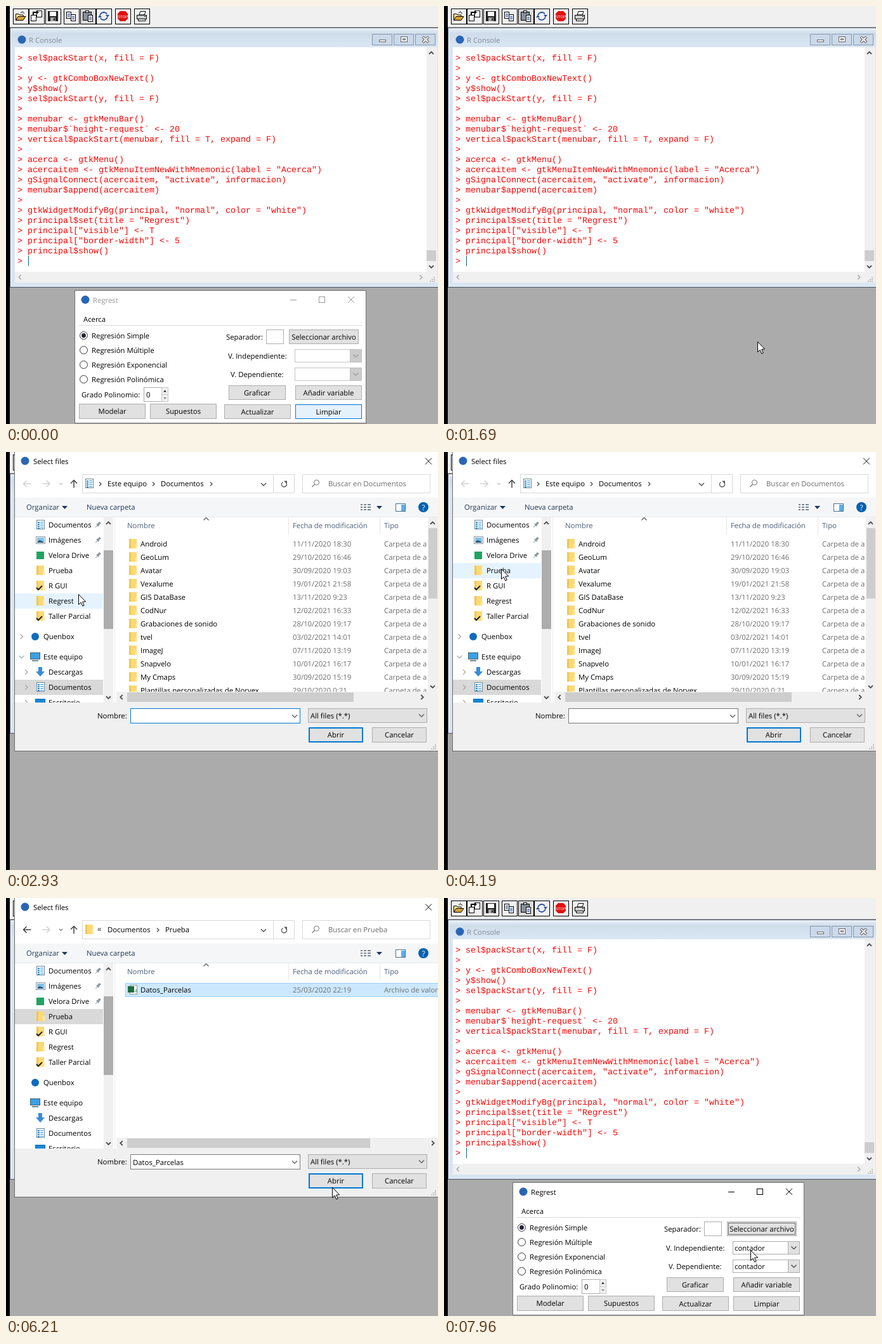
Write an HTML page with a canvas that moves like this. It is 681 px wide and 659 px high and loops after 8 s.

```html
<!DOCTYPE html>
<html lang="es">
<head>
<meta charset="utf-8">
<title>Regrest</title>
<style>
html, body { margin: 0; width: 100%; height: 100%; overflow: hidden; background: #ababab; }
canvas { display: block; }
</style>
</head>
<body>
<canvas id="stage" width="681" height="659"></canvas>
<script>
const c = document.getElementById('stage').getContext('2d');
const LOOP = 8000, BLUE = '#0078d7', GREY = '#adadad', FACE = '#e1e1e1';

// ---- drawing helpers ----
function box(x, y, w, h, fill, edge, lw = 1) {
  if (edge) { c.fillStyle = edge; c.fillRect(x, y, w, h); x += lw; y += lw; w -= 2 * lw; h -= 2 * lw; }
  c.fillStyle = fill;
  c.fillRect(x, y, w, h);
}
function poly(pts, stroke, fill, lw = 1) {
  c.beginPath();
  for (let i = 0; i < pts.length; i += 2) c.lineTo(pts[i], pts[i + 1]);
  if (fill) { c.closePath(); c.fillStyle = fill; c.fill(); }
  if (stroke) { c.strokeStyle = stroke; c.lineWidth = lw; c.stroke(); }
}
function disc(x, y, r, fill, stroke, lw = 1) {
  c.beginPath(); c.arc(x, y, r, 0, 7);
  if (fill) { c.fillStyle = fill; c.fill(); }
  if (stroke) { c.strokeStyle = stroke; c.lineWidth = lw; c.stroke(); }
}
function text(s, x, y, color = '#000', size = 11.35, align = 'left', font = '"Open Sans"') {
  c.font = `${size}px ${font}, sans-serif`;
  c.textAlign = align;
  c.fillStyle = color;
  c.fillText(s, x, y);
}
// dir: 0 right, 1 down, 2 left, 3 up
function chevron(x, y, dir, size, color, lw = 1.2) {
  c.save(); c.translate(x, y); c.rotate(dir * Math.PI / 2);
  poly([-size / 2, -size, size / 2, 0, -size / 2, size], color, null, lw);
  c.restore();
}
function at(x, y, draw) { c.save(); c.translate(x, y); draw(); c.restore(); }
function clip(x, y, w, h, draw) {
  c.save(); c.beginPath(); c.rect(x, y, w, h); c.clip(); draw(); c.restore();
}
function cross(x, y, r, color, lw) {
  poly([x - r, y - r, x + r, y + r], color, null, lw);
  poly([x - r, y + r, x + r, y - r], color, null, lw);
}
function button(label, x, y, w, h, state) {
  const [fill, edge] = { hot: ['#e5f1fb', BLUE], down: ['#cce4f7', '#005499'] }[state] || [FACE, GREY];
  box(x, y, w, h, fill, edge);
  text(label, x + w / 2, y + h / 2 + 4, '#000', 11.35, 'center');
}
function grip(x, y) {
  for (let i = 0; i < 3; i++) for (let j = 0; j <= i; j++) box(x + 3 * (2 - j), y + 3 * i, 2, 2, '#bfbfbf');
}
const inside = (p, x, y, w, h) => p.x >= x && p.x < x + w && p.y >= y && p.y < y + h;

// ---- timing ----
// Progress in n equal jumps, the first at a and the last at b
function step(t, a, b, n) {
  if (t < a) return 0;
  return b > a ? Math.min(1, (Math.floor((t - a) / (b - a) * (n - 1) + 1e-6) + 1) / n) : 1;
}
// start, end, jumps, x, y
const moves = [
  [450, 990, 8, 494, 529], [1920, 2060, 3, 316, 441], [2140, 2700, 8, 150, 262],
  [2780, 2930, 3, 114, 223.5], [3010, 3170, 3, 100, 205], [3550, 3780, 4, 90, 184],
  [4430, 4820, 6, 234, 138], [5120, 5200, 2, 233, 141], [5350, 6120, 11, 515, 462],
  [6210, 6210, 1, 514, 456], [6290, 6510, 4, 515, 447], [7420, 7570, 3, 478, 520],
  [7650, 7800, 3, 344, 563], [7880, 7960, 2, 483, 555]
];
function pointer(t) {
  const p = { x: 656, y: 645 };
  for (const [a, b, n, x, y] of moves) {
    const k = step(t, a, b, n), e = k * k * (3 - 2 * k);
    p.x += (x - p.x) * e;
    p.y += (y - p.y) * e;
  }
  return p;
}
function drawPointer(p) {
  at(Math.round(p.x) + .5, Math.round(p.y) + .5, () =>
    poly([0, 0, 0, 16, 3.7, 12.6, 6.3, 18.5, 8.7, 17.4, 6.2, 11.6, 11.2, 11.4, 0, 0], '#000', '#fff'));
}

// ---- console ----
const code = `sel$packStart(x, fill = F)

y <- gtkComboBoxNewText()
y$show()
sel$packStart(y, fill = F)

menubar <- gtkMenuBar()
menubar$\`height-request\` <- 20
vertical$packStart(menubar, fill = T, expand = F)

acerca <- gtkMenu()
acercaitem <- gtkMenuItemNewWithMnemonic(label = "Acerca")
gSignalConnect(acercaitem, "activate", informacion)
menubar$append(acercaitem)

gtkWidgetModifyBg(principal, "normal", color = "white")
principal$set(title = "Regrest")
principal["visible"] <- T
principal["border-width"] <- 5
principal$show()
`.split('\n');

const page = (x, y) => {
  box(x, y, 8, 11, '#fff', '#000');
  for (let i = 3; i < 9; i += 2) box(x + 2, y + i, 4, 1, '#24509c');
};
const tools = [
  [11, () => {
    poly([4.5, 18, 4.5, 8.5, 9, 8.5, 10, 10, 16, 10, 16, 13], '#000', '#ffe9a8');
    poly([4.5, 18.5, 8, 12.5, 20, 12.5, 16, 18.5, 4.5, 18.5], '#000', '#d8a23a');
    poly([12, 7, 15, 5, 18, 8], '#000');
  }],
  [36, () => {
    box(3, 10, 9, 10, '#fff', '#000'); box(12, 3, 9, 11, '#fff', '#000');
    poly([7, 10, 7, 6, 13, 6], '#000', null, 2); poly([12, 3, 16, 6, 12, 9], null, '#000');
  }],
  [62, () => { box(4, 4, 16, 16, '#222'); box(7, 5, 10, 7, '#fff'); box(8, 14, 8, 6, '#aaa'); box(13, 15, 2, 4, '#222'); }],
  [91, () => { page(4, 5); page(11, 9); }],
  [117, () => { box(4, 5, 14, 14, '#87909c', '#000'); box(8, 3, 6, 4, '#ddd', '#000'); page(12, 10); }],
  [142, () => {
    c.strokeStyle = '#24509c'; c.lineWidth = 1.8;
    for (const a of [3.4, .3]) { c.beginPath(); c.arc(12, 12, 6, a, a + 2.3); c.stroke(); }
    poly([15, 10, 21, 10, 18, 14], null, '#24509c'); poly([3, 14, 9, 14, 6, 10], null, '#24509c');
  }],
  [172, () => {
    poly([8, 4, 16, 4, 20, 8, 20, 16, 16, 20, 8, 20, 4, 16, 4, 8], null, '#e01010');
    text('STOP', 12, 14.5, '#fff', 6, 'center', '"Liberation Sans"');
  }],
  [202, () => {
    poly([8, 10, 10, 4.5, 18, 4.5, 16, 10], '#000', '#fff');
    box(4, 10, 16, 7, '#ccc', '#000'); box(6, 16, 12, 4, '#fff', '#000'); box(16, 12, 2, 1, '#000');
  }]
];

function desktop() {
  box(0, 0, 681, 659, '#ababab');
  box(0, 0, 6, 659, '#000');
  box(6, 0, 675, 33, '#f0f0f0');
  box(6, 33, 675, 1, '#a0a0a0');
  for (const [x, icon] of tools) {
    box(x, 4, 25, 25, x === 117 ? '#dcdcdc' : '#f0f0f0', '#000');
    at(x, 4, icon);
  }

  box(6, 34, 677, 410, '#f4f8fc', '#4a5361');
  box(8, 36, 675, 407, '#d9e5f2');
  const g = c.createLinearGradient(0, 36, 0, 65);
  g.addColorStop(0, '#e6eef7'); g.addColorStop(.25, '#cfddeb'); g.addColorStop(1, '#dae6f3');
  c.fillStyle = g; c.fillRect(8, 36, 673, 29);
  disc(25, 53, 6.5, '#2a66b5');
  text('R Console', 36, 58, '#838b94');
  [577, 611, 645].forEach((x, i) => {
    box(x, 44, 32, 18, '#cbd9ea', '#8796a9');
    if (i === 0) box(x + 11, 53, 11, 4, '#fff', '#666');
    if (i === 1) { box(x + 11, 48, 11, 9, '#fff', '#666'); box(x + 14, 51, 5, 3, '#cbd9ea', '#666'); }
    if (i === 2) {
      cross(x + 16.5, 53, 4.5, '#666', 4);
      cross(x + 16.5, 53, 4, '#fff', 1.8);
    }
  });
  box(14, 65, 666, 371, '#f0f0f0');
  box(14, 65, 649, 354, '#fff');
  box(663, 385, 15, 17, '#cdcdcd');
  chevron(670.5, 74, 3, 3.5, '#505050', 1.8);
  chevron(670.5, 411, 1, 3.5, '#505050', 1.8);
  chevron(22, 427.5, 2, 3.5, '#a8a8a8', 1.5);
  chevron(654, 427.5, 0, 3.5, '#a8a8a8', 1.5);
  grip(668, 427);
  code.forEach((s, i) => text('> ' + s, 18, 86 + 16 * i, '#f00', 13.333, 'left', '"Liberation Mono"'));
  box(35, 394, 1, 16, '#00667f');
}

// ---- small window ----
function combo(y, value) {
  box(455, y, 106, 21, '#fff', value ? GREY : '#c4c4c4');
  box(542, y, 19, 21, value ? FACE : '#cccccc', value ? GREY : '#bfbfbf');
  chevron(551.5, y + 10.5, 1, 4, value ? '#404040' : '#999');
  if (value) text(value, 458, y + 15);
}
function regrest(t, p) {
  const active = t >= 1220, loaded = t >= 6670, ink = active ? '#000' : '#999';
  box(108, 448, 460, 210, '#fff', '#707070');
  disc(125, 463, 6.5, '#2a66b5');
  text('Regrest', 137, 468, ink);
  box(448, 463, 10, 1, ink);
  box(493, 458, 10, 10, '#fff', ink);
  cross(544, 463, 5, ink);
  text('Acerca', 122, 498);
  box(114, 503, 448, 1, '#dcdcdc');
  ['Simple', 'Múltiple', 'Exponencial', 'Polinómica'].forEach((s, i) => {
    const y = 520 + 23 * i;
    disc(122.5, y - .5, 6, '#fff', '#333');
    if (!i) disc(122.5, y - .5, 3.4, '#223');
    text('Regresión ' + s, 135, y + 4);
  });
  text('Grado Polinomio:', 119, 617);
  box(217, 601, 39, 23, '#fff', GREY);
  box(245, 601, 11, 12, '#f0f0f0', '#c8c8c8');
  box(245, 612, 11, 12, '#f0f0f0', '#c8c8c8');
  poly([248, 608.5, 253, 608.5, 250.5, 605.5], null, '#222');
  poly([248, 617, 253, 617, 250.5, 620], null, '#888');
  text('0', 221, 617);
  text('Separador:', 347, 526);
  box(410, 510, 28, 23, '#fff', GREY);
  text('V. Independiente:', 350, 556);
  text('V. Dependiente:', 354, 585);
  combo(541, loaded && 'contador');
  combo(570, loaded && 'contador');
  const pressed = t >= 1290 && t < 1370;
  button('Seleccionar archivo', 446, 510, 110, 23,
    pressed ? 'down' : inside(p, 446, 510, 110, 23) ? 'hot' : '');
  if (active) {
    c.setLineDash([1, 1]); c.strokeStyle = '#000'; c.lineWidth = 1;
    c.strokeRect(448.5, 512.5, 105, 18);
    c.setLineDash([]);
  }
  button('Graficar', 351, 598, 90, 23);
  button('Añadir variable', 456, 598, 105, 23);
  button('Modelar', 115, 627, 105, 24);
  button('Supuestos', 227, 627, 105, 24);
  button('Actualizar', 344, 628, 105, 23);
  button('Limpiar', 456, 628, 105, 23, t < 450 ? 'hot' : '');
}

// ---- file dialog ----
const icons = {
  folder(x, y) { box(x + 1, y - 8, 12, 15, '#fbd976'); box(x + 1, y - 8, 3, 15, '#f3c74f'); box(x + 11, y, 3, 7, '#ffe9a6'); },
  checked(x, y) { icons.folder(x, y); poly([x + 1, y + 3, x + 4, y + 6, x + 10, y], '#1d2530', null, 2); },
  doc(x, y) {
    box(x + 1, y - 8, 13, 15, '#fff', '#6a8796');
    for (let i = -5; i < 5; i += 3) { box(x + 3, y + i, 3, 2, '#2a8ed2'); box(x + 7, y + i, 5, 1, '#2a8ed2'); }
  },
  image(x, y) {
    box(x, y - 6, 15, 12, '#fff', '#8a979f'); box(x + 2, y - 4, 11, 8, '#7fc1ec');
    poly([x + 2, y + 4, x + 5, y, x + 9, y + 1, x + 13, y + 4], null, '#2b5d78');
  },
  drive(x, y) { box(x + 1, y - 6, 12, 12, '#1fa463'); },
  cloud(x, y) { disc(x + 8, y, 6, '#0f6cbd'); },
  pc(x, y) { box(x, y - 7, 16, 11, '#3ba0e6', '#45606e'); box(x + 3, y + 5, 10, 2, '#6c8794'); },
  down(x, y) { poly([x + 4, y - 8, x + 10, y - 8, x + 10, y - 1, x + 14, y - 1, x + 7, y + 7, x, y - 1, x + 4, y - 1], null, '#3a8bd8'); },
  desk(x, y) { box(x - 1, y - 6, 16, 12, '#1387d8', '#0b6bb5'); }
};
// label, icon, centre, depth, chevron direction
const places = [
  ['Documentos', 'doc', 115, 1], ['Imágenes', 'image', 139, 1], ['Velora Drive', 'drive', 163, 1],
  ['Prueba', 'folder', 187, 1], ['R GUI', 'folder', 211, 1], ['Regrest', 'folder', 235, 1],
  ['Taller Parcial', 'checked', 259, 1], ['Quenbox', 'cloud', 291, 0, 0], ['Este equipo', 'pc', 323, 0, 1],
  ['Descargas', 'down', 347, 1, 0], ['Documentos', 'doc', 371, 1, 0], ['Escritorio', 'desk', 395, 1, 0]
];
const folders = [
  ['Android', '11/11/2020 18:30'], ['GeoLum', '29/10/2020 16:46'], ['Avatar', '30/09/2020 19:03'],
  ['Vexalume', '19/01/2021 21:58'], ['GIS DataBase', '13/11/2020 9:23'], ['CodNur', '12/02/2021 16:33'],
  ['Grabaciones de sonido', '28/10/2020 19:17'], ['tvel', '03/02/2021 14:01'], ['ImageJ', '07/11/2020 13:19'],
  ['Snapvelo', '10/01/2021 16:17'], ['My Cmaps', '30/09/2020 15:19'],
  ['Plantillas personalizadas de Norvex', '29/10/2020 0:21']
];
function arrow(x, y, dir, color) {
  at(x, y, () => {
    c.rotate(dir * Math.PI / 2);
    poly([-6, 0, 6, 0], color, null, 1.5);
    poly([1, -5, 6, 0, 1, 5], color, null, 1.5);
  });
}

function sidebar(t, p, opened) {
  const tree = t >= 2700 && t < 5160;
  for (const [i, [label, icon, y, depth, dir]] of places.entries()) {
    const hover = inside(p, 14, y - 12, 139, 24);
    const chosen = opened ? i === 3 : i === 10;
    if (chosen) box(14, y - 12, 139, 24, opened && tree ? '#cce8ff' : '#d9d9d9');
    else if (hover) box(14, y - 12, 139, 24, '#e5f3ff');
    const x = depth ? 47 : 38;
    icons[i === 4 && t >= 2780 ? 'checked' : icon](x, y);
    text(label, depth ? 67 : 59, y + 4);
    if (i < 3) {
      poly([141, y + 4, 144, y + 1], '#7d8a94');
      poly([142, y - 1, 146, y + 3, 147, y, 150, y - 3, 147, y - 5, 144, y - 2], null, '#8d98a0');
    }
    if (tree && dir !== undefined)
      chevron(depth ? 32 : 24.5, y, dir, 3.8, dir && opened ? '#303030' : '#a0a0a0');
  }
  box(154, 103, 15, 292, '#f0f0f0');
  box(154, 155, 15, 124, GREY);
  chevron(161.5, 112, 3, 3.5, '#505050', 1.8);
  chevron(161.5, 387, 1, 3.5, '#505050', 1.8);
}

function fileList(t, p, opened, picked) {
  if (opened) {
    if (t < 4350) return;
    const lost = t >= 6430;
    if (picked) box(188, 134, 500, 22, lost ? '#d9d9d9' : '#cce8ff', lost ? '#d9d9d9' : '#99d1ff');
    else if (inside(p, 188, 134, 493, 22)) box(188, 134, 493, 22, '#e5f3ff');
    box(195, 137, 12, 15, '#fff', '#8a979f');
    box(192, 139, 10, 10, '#1d6f42');
    text('a', 203, 148, '#1d6f42', 7);
    text('Datos_Parcelas', 212, 149);
    text('25/03/2020 22:19', 452, 149, '#6d6d6d');
    text('Archivo de valores', 596, 149, '#6d6d6d');
    return;
  }
  clip(172, 130, 492, 248, () => folders.forEach(([name, date], i) => {
    const y = 145 + 21 * i;
    icons.folder(193, y);
    text(name, 212, y + 4);
    text(date, 452, y + 4, '#6d6d6d');
    text('Carpeta de archivos', 596, y + 4, '#6d6d6d');
  }));
  box(665, 103, 16, 275, '#f0f0f0');
  box(666, 120, 14, 111, '#cdcdcd');
  chevron(672.5, 112, 3, 3.5, '#505050', 1.8);
  chevron(672.5, 370, 1, 3.5, '#505050', 1.8);
}

function dialog(t, p) {
  const opened = t >= 4270, picked = t >= 4970, focus = t < 4190;
  box(13, -1, 670, 473, '#fff', '#6b6b6b');
  disc(30, 14, 6.5, '#2a66b5');
  text('Select files', 43, 19);
  cross(666, 14.5, 5, '#000');

  arrow(33.5, 50, 2, opened ? '#404040' : '#d0d0d0');
  arrow(63, 50, 0, '#d0d0d0');
  chevron(86.5, 50, 1, 2.6, opened ? '#707070' : '#c0c0c0');
  arrow(107, 50.5, 3, '#404040');
  box(120, 35, 335, 30, '#fff', '#d9d9d9');
  box(421, 35, 1, 30, '#d9d9d9');
  icons[opened ? 'folder' : 'doc'](124, 50);
  if (opened) {
    text('«', 144, 53, '#333', 13);
    text('Documentos', 160, 54);
    chevron(239.5, 50.5, 0, 3, '#444');
    text('Prueba', 251, 54);
  } else {
    chevron(148.5, 50.5, 0, 3, '#444');
    text('Este equipo', 160, 54);
    chevron(232.5, 50.5, 0, 3, '#444');
    text('Documentos', 244, 54);
    if (t >= 2130) chevron(323.5, 50.5, 0, 3, '#444');
  }
  chevron(406, 51, 1, 4, '#555', 1.5);
  c.strokeStyle = '#555'; c.lineWidth = 1.4;
  c.beginPath(); c.arc(438.5, 51, 4, -.7, 4.2); c.stroke();
  poly([438, 45.5, 443, 45.5, 443, 50.5], null, '#555');
  box(467, 35, 202, 30, '#fff', '#d9d9d9');
  disc(489.5, 48, 4, null, '#777');
  poly([486.5, 51, 482.5, 55], '#777', null, 1.3);
  text('Buscar en ' + (opened ? 'Prueba' : 'Documentos'), 508, 54, '#6d6d6d');

  box(14, 72, 667, 30, '#f5f6f7');
  box(14, 102, 667, 1, '#e9eaeb');
  text('Organizar', 32, 91, '#1e395b');
  poly([88, 85, 97, 85, 92.5, 90], null, '#1e395b');
  text('Nueva carpeta', 127, 91, '#1e395b');
  for (let i = 0; i < 3; i++) {
    box(559, 82 + 4 * i, 3, 2, '#7b8794'); box(564, 82 + 4 * i, 4, 2, '#7b8794'); box(570, 82 + 4 * i, 5, 2, '#7b8794');
  }
  poly([584, 85, 593, 85, 588.5, 90], null, '#1e395b');
  box(614, 81, 16, 13, '#fff', '#4c708c'); box(623, 83, 6, 10, '#5aaee8');
  disc(658, 87, 8, '#0061b0');
  text('?', 658, 91.5, '#fff', 12, 'center');

  clip(14, 103, 157, 292, () => sidebar(t, p, opened));
  box(171, 103, 1, 292, '#ececec');
  text('Nombre', 191, 120, '#4c607a');
  text('Fecha de modificación', 452, 120, '#4c607a');
  text('Tipo', 596, 120, '#4c607a');
  chevron(315.5, 105.5, 3, 4, '#555');
  box(445, 103, 1, 27, '#e5e5e5');
  box(589, 103, 1, 27, '#e5e5e5');
  fileList(t, p, opened, picked);
  box(174, 378, 507, 17, '#f0f0f0');
  box(191, 379, opened ? 383 : 357, 15, '#cdcdcd');
  chevron(182, 386.5, 2, 3.5, '#505050', 1.8);
  chevron(opened ? 673 : 656, 386.5, 0, 3.5, '#505050', 1.8);

  box(14, 395, 667, 76, '#f0f0f0');
  text('Nombre:', 144, 420);
  box(196, 404, 268, 24, '#fff', focus ? BLUE : '#7a7a7a');
  chevron(455, 416.5, 1, 4, '#555');
  if (picked) text('Datos_Parcelas', 200, 421);
  if (focus && Math.floor((t - 1990) / 530) % 2 === 0) box(200, 409, 1, 15, '#000');
  box(476, 404, 188, 23, FACE, GREY);
  text('All files (*.*)', 480, 420);
  chevron(655, 415.5, 1, 4, '#555');
  const hot = t >= 6290, down = t >= 6430 && t < 6510;
  box(477, 434, 86, 24, down ? '#cce4f7' : hot ? '#e5f1fb' : FACE, BLUE, 2);
  text('Abrir', 520, 450, '#000', 11.35, 'center');
  button('Cancelar', 577, 434, 86, 24);
  grip(670, 461);
}

function frame(now) {
  const t = now % LOOP, p = pointer(t);
  c.textRendering = 'geometricPrecision';
  const back = step(t, 6670, 6830, 3);
  const small = t < 3000 ? 1 - step(t, 1520, 1690, 3) : back;
  const big = t < 3000 ? step(t, 1920, 2060, 3) : 1 - back;
  desktop();
  for (const [alpha, draw] of [[small, regrest], [big, dialog]]) {
    c.globalAlpha = alpha;
    if (alpha > 0) draw(t, p);
  }
  c.globalAlpha = 1;
  if (t >= 130) drawPointer(p);
  requestAnimationFrame(frame);
}
requestAnimationFrame(frame);
</script>
</body>
</html>
```
